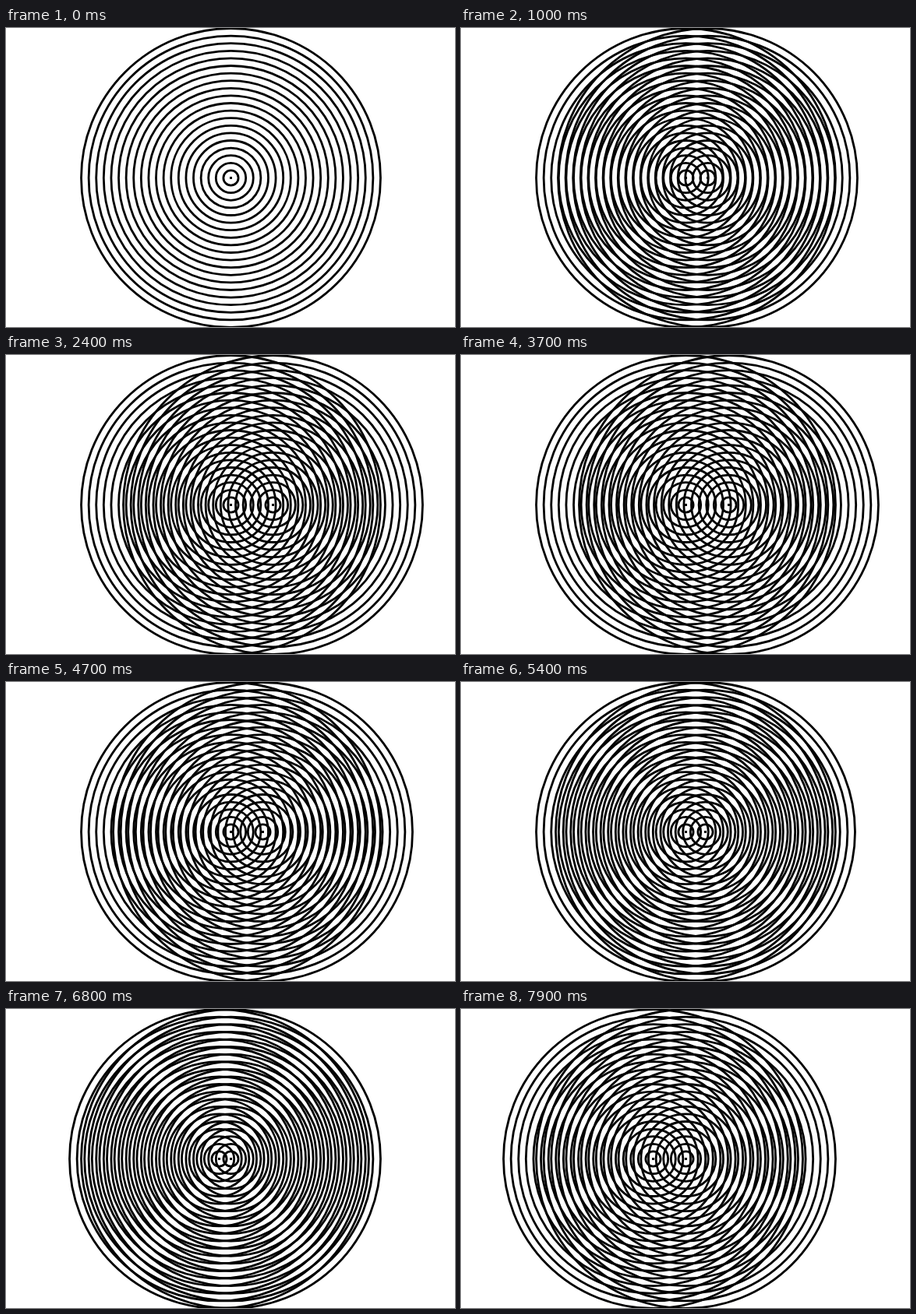
An HTML page with a canvas for the animation above (8 s loop, 576 px wide and 384 px high).

```html
<!DOCTYPE html>
<html lang="en">
<head>
<meta charset="utf-8">
<title>Moiré rings</title>
<style>
html, body { margin: 0; width: 100%; height: 100%; overflow: hidden; background: #fff; }
canvas { display: block; }
</style>
</head>
<body>
<canvas id="stage" width="576" height="384"></canvas>
<script>
const ctx = document.getElementById("stage").getContext("2d");
const W = 576, H = 384;
const LOOP = 8000, STEP = 100;
const RINGS = 20, GAP = H / 2 / RINGS, SWING = W / 10;
const CX = W / 2 + 0.5, CY = H / 2 + 0.5;

function rings(x, y) {
  ctx.fillRect(x - 1.5, y - 1.5, 3, 3);
  for (let i = 1; i <= RINGS; i++) {
    ctx.beginPath();
    ctx.arc(x, y, i * GAP, 0, Math.PI * 2);
    ctx.stroke();
  }
}

function draw(ms) {
  const t = Math.floor((ms % LOOP) / STEP) * STEP / 1000;
  const shift = Math.round(SWING * Math.sin(t / 2));
  ctx.fillStyle = "#fff";
  ctx.fillRect(0, 0, W, H);
  ctx.fillStyle = ctx.strokeStyle = "#000";
  ctx.lineWidth = 2.8;
  rings(CX, CY);
  // At rest both sets coincide; one pass keeps the edges smooth.
  if (shift) rings(CX + shift, CY);
}

const start = performance.now();
function tick() {
  draw(performance.now() - start);
  requestAnimationFrame(tick);
}
tick();
</script>
</body>
</html>
```
